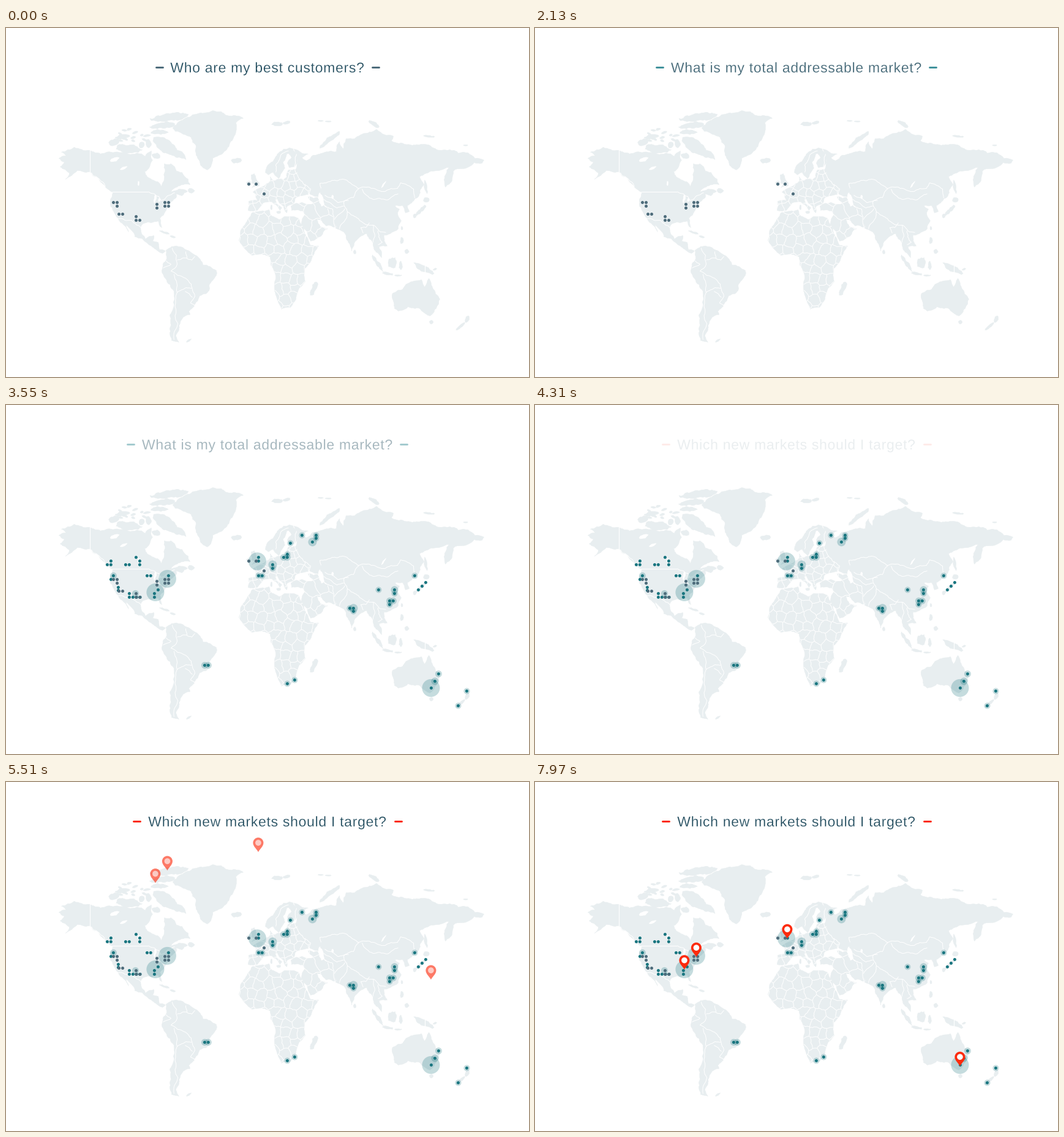
Write a matplotlib script that moves like this. It is 854 px wide and 569 px high and loops after 8000 ms.

```python
import random

import matplotlib.pyplot as plt
import numpy as np
from matplotlib.animation import FuncAnimation
from matplotlib.collections import LineCollection, PolyCollection
from matplotlib.patches import PathPatch
from matplotlib.path import Path
from matplotlib.textpath import TextPath
from matplotlib.transforms import Affine2D
from matplotlib.tri import Triangulation

W, H, DPI = 854, 569, 64
LOOP, STEP = 8000, 25
PX = 72 / DPI  # points per pixel
GRID = 5.9     # distance between neighbouring dots
DOT = 2.5      # dot radius
SHIFT = 0.6    # the drawing sits slightly up and left

LAND, INK, SLATE, TEAL, RED = "#e8eef0", "#1f4a5c", "#4d6c7b", "#18757f", "#fc2a0c"

random.seed(7)
lands, lakes, borders = [], [], []


def smooth(t, start, end):
    u = np.clip((t - start) / (end - start), 0, 1)
    return u * u * (3 - 2 * u)


def jagged(a, b, amp):
    """Midpoint displacement between two points, without the end point."""
    (x0, y0), (x1, y1) = a, b
    if np.hypot(x1 - x0, y1 - y0) < 4:
        return [a]
    k = random.uniform(-amp, amp)
    mid = ((x0 + x1) / 2 - (y1 - y0) * k, (y0 + y1) / 2 + (x1 - x0) * k)
    return jagged(a, mid, amp) + jagged(mid, b, amp)


def rough(pts, amp, closed=True):
    ends = pts[1:] + pts[:1] if closed else pts[1:]
    out = [p for a, b in zip(pts, ends) for p in jagged(a, b, amp)]
    return out if closed else out + pts[-1:]


def pairs(v):
    return list(zip(v[::2], v[1::2]))


def land(*v, amp=0.13):
    lands.append(rough(pairs(v), amp))
    return lands[-1]


def border(*v, amp=0.12):
    borders.append(rough(pairs(v), amp, closed=False))


def blob(x, y, w, h, tilt=0, into=lands):
    """Uneven oval, used for islands and lakes."""
    a = np.linspace(0, 2 * np.pi, 10)[:-1]
    r = np.array([random.uniform(0.8, 1.15) for _ in a]) / 2
    pts = np.column_stack([w * r * np.cos(a), h * r * np.sin(a)])
    pts = Affine2D().rotate_deg(tilt).translate(x, y).transform(pts)
    into.append(rough([tuple(p) for p in pts], 0.15))


def countries(outline, step):
    """Borders between randomly shifted cells, cut off at the outline."""
    x0, y0 = np.min(outline, axis=0) - 2 * step
    x1, y1 = np.max(outline, axis=0) + 2 * step
    pts = [(x + step / 2 * (row % 2) + random.uniform(-0.3, 0.3) * step,
            y + random.uniform(-0.3, 0.3) * step)
           for row, y in enumerate(np.arange(y0, y1, step))
           for x in np.arange(x0, x1, step)]
    tri = Triangulation(*np.transpose(pts))
    a, b, c = np.array(pts)[tri.triangles].transpose(1, 0, 2)
    b, c = b - a, c - a
    d = 2 * (b[:, 0] * c[:, 1] - b[:, 1] * c[:, 0])
    bb, cc = (b ** 2).sum(1), (c ** 2).sum(1)
    mid = a + np.column_stack([c[:, 1] * bb - b[:, 1] * cc, b[:, 0] * cc - c[:, 0] * bb]) / d[:, None]
    lines = [rough([tuple(mid[i]), tuple(mid[j])], 0.12, closed=False)
             for i, near in enumerate(tri.neighbors) for j in near
             if j > i and np.hypot(*(mid[i] - mid[j])) < 2 * step]
    art = LineCollection(lines, colors="white", linewidths=PX, zorder=2)
    art.set_clip_path(Path(outline + outline[:1]), ax.transData)
    ax.add_collection(art, autolim=False)


fig = plt.figure(figsize=(W / DPI, H / DPI), dpi=DPI, facecolor="white")
ax = fig.add_axes([0, 0, 1, 1])
ax.set_xlim(SHIFT, W + SHIFT)
ax.set_ylim(H + SHIFT, SHIFT)
ax.axis("off")

# North America
land(137,200, 112,195, 91,203, 99,209, 87,213, 96,219, 89,227, 104,237, 98,247, 117,233, 137,235,
     152,246, 163,259, 174,268, 240,272, 254,283, 276,270, 288,274, 297,267, 283,263, 270,268,
     280,260, 301,256, 298,247, 288,236, 279,234, 270,222, 259,222, 259,246, 254,260, 248,251,
     231,243, 227,235, 240,216, 238,201, 228,210, 200,206, 172,203, 155,206)
land(174,266, 171,283, 176,299, 184,311, 201,333, 192,315, 206,331, 211,341, 232,352, 247,363,
     256,368, 261,364, 251,362, 249,350, 240,348, 242,339, 228,345, 222,336, 222,322, 232,317,
     249,315, 255,326, 252,311, 262,298, 268,288, 279,276, 278,270, 262,275, 240,269, 232,266)
greenland = land(273,164, 300,146, 325,139, 352,137, 388,148, 376,155, 376,170, 370,184, 357,202,
                 338,213, 329,232, 318,224, 311,208, 311,193, 303,179, 277,169)
blob(250, 171, 30, 7)
blob(266, 146, 62, 11, -8)
blob(256, 160, 46, 10, -10)
blob(264, 196, 64, 18, 32)
blob(200, 197, 42, 15, 5)
blob(178, 187, 18, 11, -15)
blob(193, 177, 22, 6)
blob(233, 189, 9, 13)
blob(222, 191, 10, 10)
blob(246, 209, 14, 9)
for _ in range(14):
    blob(random.uniform(185, 232), random.uniform(162, 186), random.uniform(5, 12), 3.5,
         random.uniform(-30, 30))
blob(303, 266, 10, 8)
blob(166, 261, 9, 3, 45)
blob(260, 334, 18, 3, 20)
blob(273, 341, 9, 3, 10)
blob(244, 279, 4, 14, 10, lakes)
blob(251, 281, 4, 7, 20, lakes)
blob(178, 215, 16, 7, -20, lakes)
blob(193, 229, 14, 4, -25, lakes)
blob(217, 254, 3, 9, 0, lakes)
border(137.5,196, 137.5,236, amp=0)
border(137.5,235, 152,246, 163,259)
border(174,267.5, 233,267.5, amp=0)
border(233,267.5, 250,275, 254,282, 276,269)
border(184,311, 205,314, 214,322, 222,327)

# South America
land(262,363, 271,357, 292,361, 318,378, 322,387, 344,396, 344,404, 336,414, 332,429, 317,437,
     309,451, 299,463, 301,468, 290,472, 283,486, 278,503, 283,513, 271,510, 268,490, 274,448,
     275,430, 261,409, 255,396, 263,377)
blob(299, 510, 9, 3, -30)
border(272,359, 279,371, 280,386, 270,397, 281,404, 303,418, 306,431, 309,438, 302,449, 309,453)
border(280,379, 296,376, 304,379, 309,373)
border(294,365, 296,376)
border(257,392, 270,386, 262,380)
border(275,402, 280,432, 277,456, 275,509)
border(280,432, 295,424, 304,425)
border(293,430, 305,440)

# Europe and Africa
nordic = land(424,236, 426,228, 437,218, 447,203, 463,196, 470,198, 459,206, 453,219, 456,229,
              449,239, 446,246, 440,241, 437,236, 429,240)
land(469,199, 476,206, 477,220, 472,227, 463,228, 460,221, 467,212, 462,205)
europe = land(474,231, 480,247, 497,262, 494,272, 484,274, 474,277, 470,287, 459,292, 459,302,
              454,291, 444,279, 440,281, 451,294, 448,298, 435,284, 420,286, 411,298, 396,298,
              397,283, 411,282, 409,271, 404,268, 416,261, 432,250, 432,243, 437,249, 454,248,
              459,244, 462,232)
land(401,240, 406,238, 414,253, 414,258, 402,261, 406,256, 402,253)
blob(377, 217, 19, 9, -5)
blob(397, 254, 7, 8)
blob(446, 301, 7, 4)
blob(434, 293, 3, 8)
blob(444, 157, 19, 7)
blob(459, 155, 12, 5, -10)
blob(531, 182, 44, 7, -36)
africa = land(402,302, 430,297, 432,305, 447,313, 455,308, 478,311, 488,335, 498,355, 511,356,
              503,370, 488,393, 489,414, 479,425, 474,443, 465,456, 450,459, 439,428, 441,405,
              433,387, 432,374, 423,370, 402,371, 391,361, 381,347, 384,330, 397,311, amp=0.08)
blob(503, 425, 8, 28, 18)
countries(europe, 12.5)
countries(africa, 16)
border(462,201, 449,208, 441,224, 441,236)

# Asia
land(471,198, 494,206, 484,212, 491,217, 502,208, 519,204, 540,202, 545,186, 551,198, 556,181,
     570,181, 590,172, 606,166, 633,177, 630,184, 664,192, 683,190, 704,199, 725,199, 755,204,
     781,216, 778,221, 765,220, 745,230, 731,234, 729,248, 718,260, 716,248, 724,228, 698,234,
     676,243, 683,256, 675,274, 668,279, 640,268, 600,272, 560,262, 513,268, 512,276, 496,271,
     480,247, 474,231, 477,220, 474,206)
land(513,262, 560,255, 600,262, 650,255, 670,270, 668,279, 656,290, 659,300, 653,302, 648,290,
     636,290, 643,296, 640,302, 646,315, 641,328, 628,336, 618,338, 623,356, 610,357, 614,375,
     605,366, 600,351, 590,336, 569,352, 565,364, 557,346, 552,333, 538,326, 530,300, 519,288)
near_east = land(466,291, 484,285, 503,287, 494,276, 512,276, 519,289, 535,296, 540,326, 523,323,
                 508,312, 514,325, 526,328, 515,340, 498,348, 483,319, 489,305, 486,299, 467,298)
countries(near_east, 21)
blob(515, 281, 9, 24, -15, lakes)
blob(534, 276, 4, 6, 0, lakes)
blob(617, 256, 2, 15, 35, lakes)
blob(602, 157, 20, 6, 30)
blob(691, 177, 20, 3, 5)
blob(751, 192, 8, 2)
blob(514, 152, 9, 2)
blob(527, 153, 10, 2)
blob(686, 260, 4, 21, -10)
blob(687, 281, 9, 8)
blob(679, 297, 24, 6, -45)
blob(668, 307, 5, 7)
blob(647, 327, 3, 6)
blob(570, 366, 4, 7)
border(475,206, 471,228, 480,247, 498,263, 496,272, 513,277)
border(515,262, 513,254, 533,249, 550,247, 575,262, 597,262, 620,267, 640,262, 645,253, 666,263,
       668,278)
border(582,263, 600,280, 622,281, 641,271)
border(577,262, 568,277, 552,285, 558,300, 585,319, 600,322, 612,333, 621,334)
border(521,273, 542,285, 560,282)
border(520,280, 541,294, 552,291)
border(519,289, 534,296, 538,327)
border(537,313, 554,295)
border(558,300, 557,310, 545,328)
border(584,335, 580,326, 588,326, 594,318)
border(600,322, 603,340, 600,350)
border(608,331, 615,350, 608,354)

# South-east Asia and Oceania
land(632,433, 648,427, 657,417, 667,413, 679,411, 684,423, 691,409, 697,424, 709,443, 703,458,
     693,470, 681,463, 673,457, 657,455, 641,462, 635,458, 631,440)
blob(647, 347, 5, 11)
blob(655, 365, 7, 7)
blob(607, 384, 34, 7, 55)
blob(624, 401, 19, 4, 10)
blob(632, 383, 15, 18, 20)
blob(645, 388, 5, 14)
blob(641, 404, 14, 2)
blob(685, 394, 40, 9, 25)
blob(701, 394, 7, 3, -20)
blob(695, 480, 6, 6)
blob(754, 475, 6, 13, 20)
blob(743, 487, 18, 4, -42)
border(684.5, 387, 684.5, 402, amp=0)

for shapes, color, width in ((lands, LAND, 0.5 * PX), (lakes, "white", 0)):
    ax.add_collection(PolyCollection(shapes, facecolor=color, edgecolor=color, linewidth=width),
                      autolim=False)
ax.add_collection(LineCollection(borders, colors="white", linewidths=PX, zorder=2), autolim=False)

# Rows of dots: first x, y, number of dots and, for the last group, halo radius
KNOWN = [(176, 285, 2), (182, 291, 1), (185, 304, 2), (213, 308, 1), (213, 314, 2), (247, 288, 1),
         (247, 294, 1), (260, 285, 2), (260, 291, 2), (397, 255, 1), (409, 255, 1), (422, 271, 1)]
NEW = [(172, 255, 1), (166, 261, 2), (196, 261, 2), (213, 249, 1), (219, 255, 1), (219, 261, 1),
       (231, 279, 2), (172, 285, 1), (184, 298, 1), (184, 303, 1), (202, 308, 1), (202, 314, 4),
       (243, 308, 1), (243, 314, 1), (249, 302, 1), (266, 279, 1), (413, 249, 1), (413, 255, 1),
       (674, 302, 1), (680, 296, 1), (686, 290, 1), (695, 462, 1)]
HALOED = [(176, 279, 1, 5.5), (413, 279, 2, 5), (436, 261, 1, 7), (436, 267, 1, 5),
          (454, 249, 2, 5.5), (460, 244, 1, 5), (465, 226, 1, 5), (484, 213, 1, 5),
          (501, 224, 1, 7), (507, 213, 1, 5), (507, 218, 1, 5), (325, 425, 2, 5.5),
          (460, 455, 1, 5), (472, 449, 1, 5), (562, 332, 1, 5), (568, 332, 1, 7),
          (568, 337, 1, 5), (609, 302, 1, 5), (635, 302, 1, 6), (635, 308, 1, 5),
          (627, 320, 2, 5.5), (627, 326, 1, 5), (668, 279, 1, 5), (707, 439, 1, 5.5),
          (701, 451, 1, 6), (753, 467, 1, 5), (739, 491, 1, 5)]
BIG = [(411, 255.5), (264, 284), (244.5, 306), (694.5, 462)]
TIPS = [(264, 286), (244.5, 306.5), (412.5, 256), (694.5, 464)]


def spread(rows):
    return [(x + GRID * i, y, *rest) for x, y, n, *rest in rows for i in range(n)]


def size(radius):
    return (2 * np.asarray(radius, float) * PX) ** 2


def spots(points, color, **kw):
    x, y = np.array([p[:2] for p in points], float).T
    return ax.scatter(x, y, color=color, linewidths=0, **kw)


halo_pts = [(x, y, 14.5) for x, y in BIG] + [(212, 308, 5.5)] + spread(HALOED)
new_pts = spread(NEW) + [p[:2] for p in spread(HALOED)]
halo_r = np.array([p[2] for p in halo_pts])
rng = np.random.default_rng(3)
halo_start = 2270 + 270 * rng.random(len(halo_pts))
new_start = 2160 + 380 * rng.random(len(new_pts))

halos = spots(halo_pts, TEAL, alpha=0.25, zorder=3)
spots(spread(KNOWN), SLATE, s=size(DOT), zorder=3.5)
fresh = spots(new_pts, TEAL, zorder=3.4)


def tracked_text(s, cx, base, em=23, gap=0.7):
    """Outline of a centred line of text with even letter spacing."""
    def glyphs(part):
        return TextPath((0, 0), part, size=em, prop={"family": "Liberation Sans"})

    bar = glyphs("|").get_extents().x1
    parts = []
    for i, ch in enumerate(s):
        if ch != " ":
            x = glyphs(s[:i] + "|").get_extents().x1 - bar + i * gap
            parts.append(Affine2D().scale(1, -1).translate(x, base).transform_path(glyphs(ch)))
    path = Path.make_compound_path(*parts)
    box = path.get_extents()
    return Affine2D().translate(cx - (box.x0 + box.x1) / 2, 0).transform_path(path)


def title(s, color, half):
    # a thin white edge makes the letters lighter
    text = PathPatch(tracked_text(s, 426.8, 73), facecolor=INK, edgecolor="white",
                     linewidth=0.25 * PX, zorder=5)
    arts = [ax.add_patch(text)]
    for x in (427.5 - half, 427.5 + half - 14):
        arts += ax.plot([x + 1.5, x + 12.5], [64.6, 64.6], color=color, lw=3 * PX,
                        solid_capstyle="round", zorder=5)
    return arts


titles = [title("Who are my best customers?", SLATE, 183.5),
          title("What is my total addressable market?", "#1f7f8a", 230),
          title("Which new markets should I target?", RED, 220.5)]

side = [(-2.2, -5), (-8.5, -9), (-8.5, -15.2), (-8.5, -19.9), (-4.7, -23.7)]
drop = np.array([(0, 0), *side, (0, -23.7), *[(-x, y) for x, y in side[::-1]], (0, 0)])
codes = [Path.MOVETO] + [Path.CURVE4] * 12
pin_path = Path.make_compound_path(*[Path(drop + tip, codes) for tip in TIPS])
hole_path = Path.make_compound_path(*[Path.circle((x, y - 15.2), 4.8) for x, y in TIPS])
pins = [ax.add_patch(PathPatch(p, facecolor=c, linewidth=0, zorder=z))
        for p, c, z in ((pin_path, RED, 6), (hole_path, "white", 7))]


def draw(i):
    t = i * STEP
    levels = (1 - smooth(t, 500, 1220),
              smooth(t, 1530, 2320) - smooth(t, 3160, 3850),
              smooth(t, 4160, 4910))
    for arts, a in zip(titles, levels):
        for art in arts:
            art.set_alpha(float(a))
            art.set_visible(a > 0)

    fresh.set_sizes(size(DOT * smooth(t, new_start, new_start + 300)))
    halos.set_sizes(size(halo_r * smooth(t, halo_start, halo_start + 320)))
    fresh.set_visible(t > 2150)
    halos.set_visible(t > 2250)

    fall = smooth(t, 5060, 5810)
    move = Affine2D().translate(0, -380 * (1 - fall)) + ax.transData
    for pin in pins:
        pin.set_transform(move)
        pin.set_alpha(float(fall))
        pin.set_visible(fall > 0)
    return []


anim = FuncAnimation(fig, draw, frames=LOOP // STEP, interval=STEP, repeat=True,
                     repeat_delay=0, blit=False)
plt.show()
```
